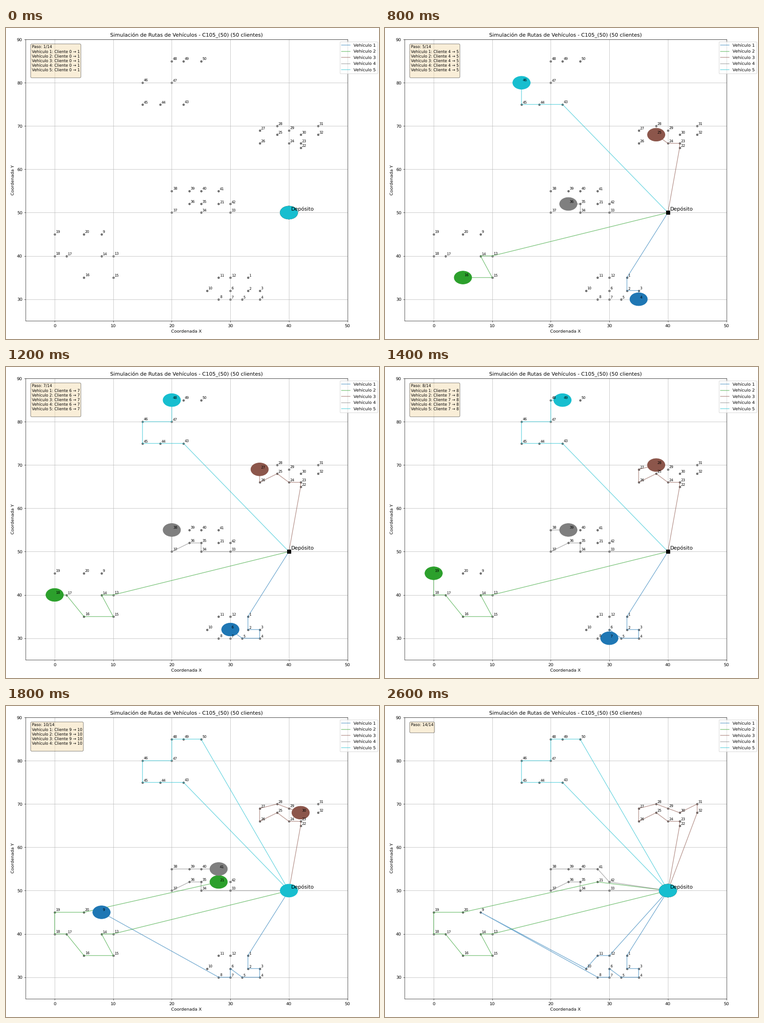
Recreate the animation shown at these times as a matplotlib script. Size 820x683 px, loop 2800 ms.

```python
import matplotlib.pyplot as plt
import numpy as np
from matplotlib.animation import FuncAnimation

plt.rcParams.update({
    "font.family": "DejaVu Sans", "text.hinting": "none",
    "axes.linewidth": 0.72, "grid.linewidth": 0.72,
    "xtick.major.width": 0.72, "ytick.major.width": 0.72,
})

W, H = 820, 683
DPI = W / 12
STEP_MS = 200
LEFT, RIGHT, TOP, BOTTOM = 42.6, 750.7, 25.15, 643.15

# Points are complex numbers, x + yj. A tour is a first client and the hops after it.
DEPOT = 40 + 50j
TOURS = [
    [33 + 35j, -3j, 2, -2j, -3, -2 + 2j, -2j, -2, -20 + 15j, 18 - 13j, 2 + 3j, 2],
    [10 + 40j, -2, 2 - 5j, -5, -3 + 5j, -2, 5j, 5, 23 + 7j],
    [42 + 65j, 1j, -2, -2 + 2j, -3 - 2j, 3j, 3 + 1j, 2 - 1j, 2 - 1j, 3 + 2j, -2j],
    [30 + 50j, -5, 2j, -2, -3 - 2j, 5j, 3, 2, 3, 2 - 3j],
    [22 + 75j, -4, -3, 5j, 5, 5j, 2, 3],
]
ROUTES = [np.array([DEPOT, *np.cumsum(tour), DEPOT]) for tour in TOURS]
CLIENTS = np.concatenate([route[1:-1] for route in ROUTES])
STEPS = max(len(route) for route in ROUTES)
COLORS = plt.cm.tab10(np.linspace(0, 1, len(ROUTES)))


def label(point, text, gap, size):
    ax.text(point.real + gap, point.imag + gap, text, fontsize=size, zorder=5)


fig = plt.figure(figsize=(12, (H + 0.001) / DPI), dpi=DPI)
ax = fig.add_axes([LEFT / W, 1 - BOTTOM / H, (RIGHT - LEFT) / W, (BOTTOM - TOP) / H])
ax.set(xlim=(-5, 50), ylim=(25, 90), xlabel="Coordenada X", ylabel="Coordenada Y")
ax.set_title("Simulación de Rutas de Vehículos - C105_(50) (50 clientes)")
ax.grid(True)

ax.scatter(CLIENTS.real, CLIENTS.imag, s=18, c="black", alpha=0.5, linewidths=1, zorder=1)
for n, client in enumerate(CLIENTS, 1):
    label(client, str(n), 0.2, 8)
ax.plot(DEPOT.real, DEPOT.imag, "ks", markersize=8, zorder=3)
label(DEPOT, "Depósito", 0.4, 12)

paths, vehicles = [], []
for n, color in enumerate(COLORS, 1):
    path, = ax.plot([], [], color=color, lw=1.5, alpha=0.6, label=f"Vehículo {n}")
    paths.append(path)
    vehicles.append(ax.add_patch(plt.Circle((0, 0), 1.5, color=color, zorder=4)))

info = ax.text(0.02, 0.98, "", transform=ax.transAxes, fontsize=9, va="top", zorder=5,
               bbox=dict(boxstyle="round", facecolor="wheat", alpha=0.5))
ax.legend(loc="upper right", bbox_to_anchor=(1.1, 1))


def update(step):
    text = f"Paso: {step + 1}/{STEPS}\n"
    for n, (route, path, vehicle) in enumerate(zip(ROUTES, paths, vehicles), 1):
        last = len(route) - 1
        done = route[:step + 1]
        path.set_data(done.real, done.imag)
        vehicle.center = done[-1].real, done[-1].imag
        if step < last:
            text += f"Vehículo {n}: Cliente {step} → {step + 1}\n"
    info.set_text(text)
    return [*paths, *vehicles, info]


anim = FuncAnimation(fig, update, frames=STEPS, init_func=lambda: update(0),
                     interval=STEP_MS, repeat=True, repeat_delay=0, blit=False)
plt.show()
```
